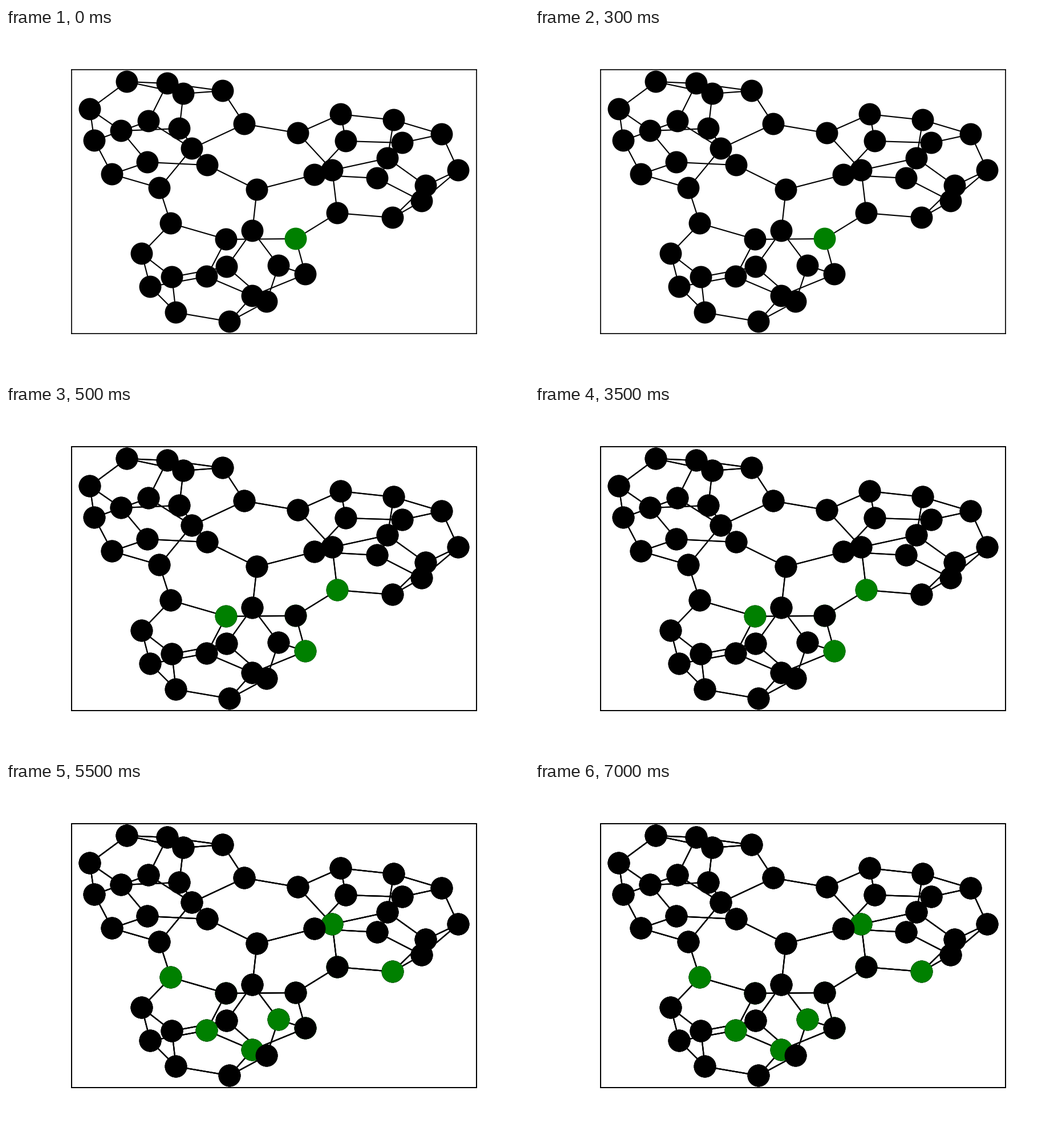
A matplotlib script for the animation above (8000 ms loop, 917x611 px).

```python
import matplotlib.pyplot as plt
from matplotlib.animation import FuncAnimation
from matplotlib.collections import LineCollection

W, H, DPI = 917, 611, 128
PT = W / 6 / DPI          # point scale of a six inch wide figure
BOX = (0.125, 0.125, 0.775, 0.755)
START = 34
STEP_TICKS = (0, 1, 11)   # ticks of 500 ms at which the search advances

NODES = [
    (212, 94), (283, 97), (311, 115), (380, 110), (147, 142), (202, 180),
    (250, 163), (304, 176), (418, 168), (155, 197), (326, 211), (248, 235),
    (353, 240), (186, 256), (269, 280), (440, 283),
    (512, 184), (587, 151), (680, 161), (764, 186), (596, 198), (695, 201),
    (669, 228), (572, 249), (541, 257), (651, 263), (793, 249), (736, 276),
    (729, 303), (581, 324), (678, 332),
    (289, 342), (386, 370), (432, 355), (508, 369), (238, 395), (253, 453),
    (291, 436), (352, 435), (387, 418), (478, 416), (525, 431), (432, 469),
    (457, 479), (298, 498), (392, 514),
]
EDGES = [
    (0, 1), (0, 2), (0, 4), (1, 3), (1, 6), (2, 3), (2, 7), (3, 8), (4, 5),
    (4, 9), (5, 7), (5, 11), (6, 9), (6, 10), (7, 12), (8, 10), (8, 16),
    (9, 13), (10, 14), (11, 12), (11, 13), (12, 15), (13, 14), (14, 31),
    (15, 24), (15, 33), (16, 17), (16, 23), (17, 18), (17, 20), (18, 19),
    (18, 22), (19, 21), (19, 26), (20, 21), (20, 24), (21, 25), (22, 23),
    (22, 27), (23, 29), (24, 25), (25, 28), (26, 27), (26, 28), (27, 30),
    (28, 30), (29, 30), (29, 34), (31, 32), (31, 35), (32, 34), (32, 38),
    (33, 39), (33, 40), (34, 41), (35, 36), (35, 37), (36, 38), (36, 44),
    (37, 39), (37, 44), (38, 42), (39, 43), (40, 41), (40, 43), (41, 42),
    (42, 45), (43, 45), (44, 45),
]


def search_fronts(start, count):
    """Breadth-first fronts around the start node."""
    seen, front, fronts = {start}, {start}, []
    for _ in range(count):
        fronts.append(front)
        near = {b for a, b in EDGES if a in front}
        near |= {a for a, b in EDGES if b in front}
        front = near - seen
        seen |= front
    return fronts


def add_layer(fig, front):
    """One full drawing of the graph; later ones are stacked on top."""
    x0, y0, w, h = BOX
    ax = fig.add_axes(BOX, label=f"layer {len(fig.axes)}")
    ax.set(xlim=(x0 * W, (x0 + w) * W), ylim=((1 - y0) * H, (1 - y0 - h) * H),
           xticks=[], yticks=[])
    ax.patch.set_visible(False)
    for spine in ax.spines.values():
        spine.set_linewidth(0.8 * PT)
    ax.add_collection(LineCollection([(NODES[a], NODES[b]) for a, b in EDGES],
                                     colors="black", linewidths=PT, zorder=1))
    colors = ["green" if i in front else "black" for i in range(len(NODES))]
    ax.scatter(*zip(*NODES), s=300 * PT ** 2, c=colors, linewidths=PT, zorder=2)
    return ax


fig = plt.figure(figsize=(W / DPI, H / DPI), dpi=DPI, facecolor="white")
layers = [add_layer(fig, f) for f in search_fronts(START, len(STEP_TICKS))]


def update(tick):
    for ax, begin in zip(layers, STEP_TICKS):
        ax.set_visible(tick >= begin)
    return layers


anim = FuncAnimation(fig, update, frames=16, interval=500, repeat=True,
                     repeat_delay=0, blit=False)
plt.show()
```
